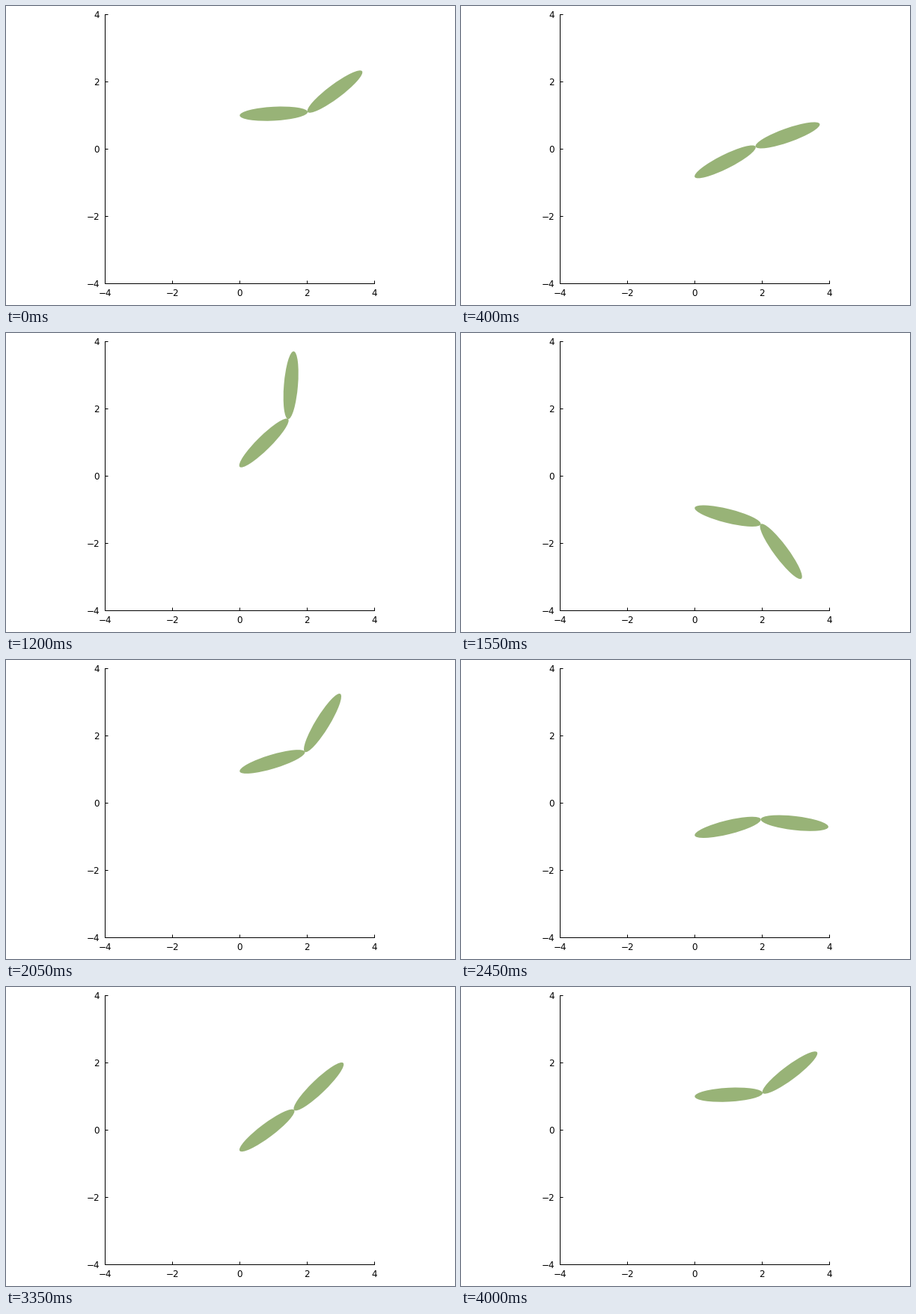
Recreate the animation shown at these times as a matplotlib script. Size 600 px wide and 400 px high, loop 4050 ms.

```python
import numpy as np
import matplotlib.pyplot as plt
from matplotlib.animation import FuncAnimation
from matplotlib.patches import Ellipse

W, H, DPI = 600, 400, 100
FRAMES, STEP_MS, CYCLE = 81, 50, 20
PX = 72 / DPI  # points per pixel
GREEN = "#98b377"
LENGTH, WIDTH = 2.02, 0.415
START, LEAD = 2, 22.3  # phase offsets in degrees

plt.rcParams["font.family"] = "DejaVu Sans"

fig = plt.figure(figsize=(W / DPI, H / DPI), dpi=DPI, facecolor="white")
left, right, top, bottom = 132.4, 492.3, 11.45, 371.45
ax = fig.add_axes([left / W, 1 - bottom / H, (right - left) / W, (bottom - top) / H])
ax.set(xlim=(-4, 4), ylim=(-4, 4))
ticks = range(-4, 5, 2)
ax.set_xticks(ticks)
ax.set_yticks(ticks)
ax.spines[["top", "right"]].set_visible(False)
for side in ("left", "bottom"):
    ax.spines[side].set_linewidth(PX)
ax.tick_params(direction="in", length=4 * PX, width=PX, labelsize=12 * PX)
ax.tick_params(axis="x", pad=7 * PX)
ax.tick_params(axis="y", pad=7.2 * PX)


def segment():
    return ax.add_patch(Ellipse((0, 0), LENGTH, WIDTH, fc=GREEN, lw=0, zorder=1))


inner, outer = segment(), segment()


def swing(phase, mean, amp):
    """Joint angle in degrees at a phase in degrees."""
    return mean + amp * np.sin(np.radians(phase))


def place(seg, root, angle):
    """Attach one tip of the segment to root and return the other tip."""
    rad = np.radians(angle)
    span = LENGTH * np.array([np.cos(rad), np.sin(rad)])
    seg.set_center(root + span / 2)
    seg.set_angle(angle)
    return root + span


def update(i):
    phase = START + 360 * (i % CYCLE) / CYCLE
    shoulder = np.array([0, np.cos(np.radians(phase))])
    elbow = place(inner, shoulder, swing(phase, 1.4, 45))
    place(outer, elbow, swing(phase + LEAD, 2.6, 83.2))
    return inner, outer


anim = FuncAnimation(fig, update, frames=FRAMES, interval=STEP_MS, repeat=True,
                     repeat_delay=0, init_func=lambda: update(0))
plt.show()
```
